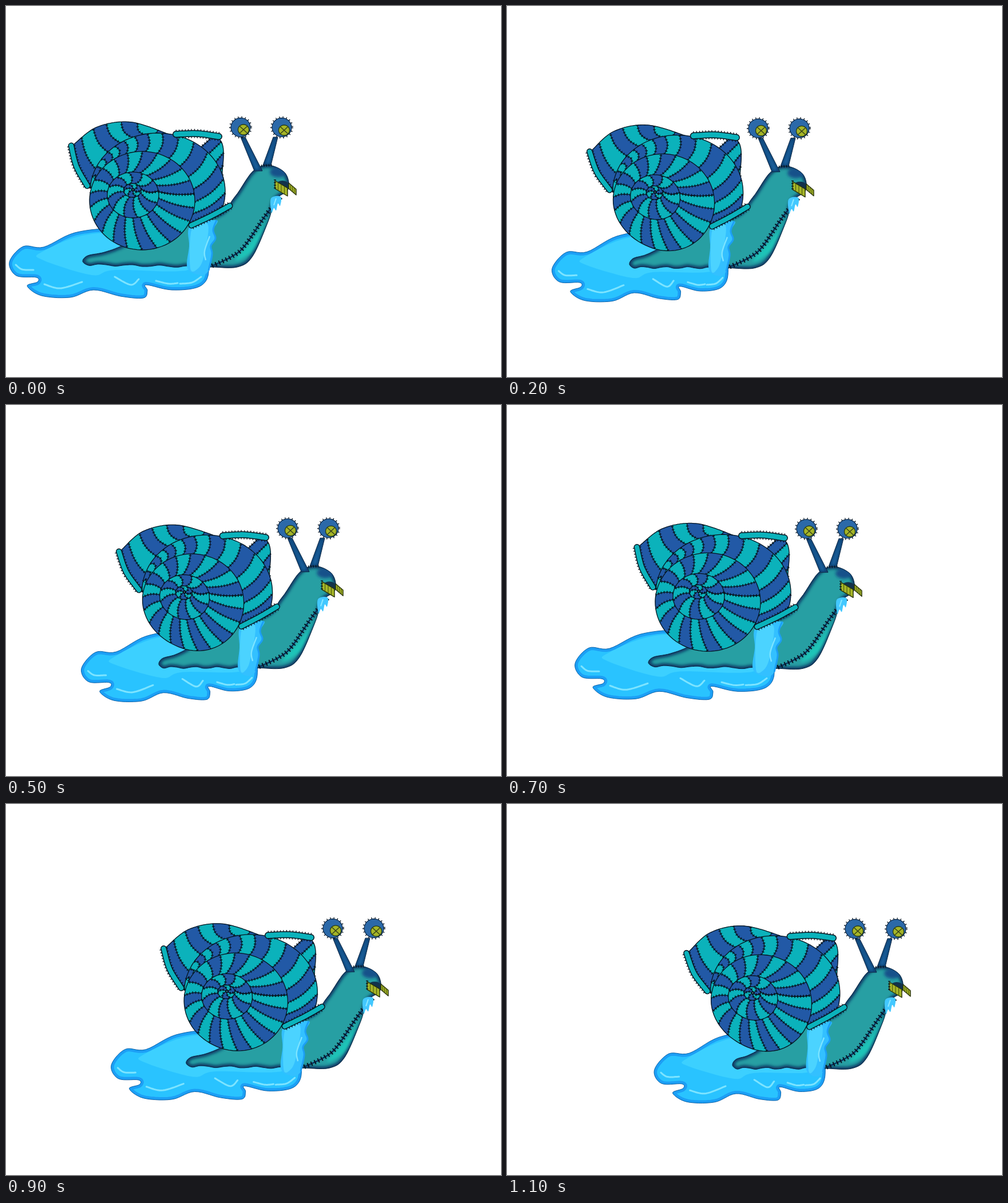
Recreate the animation shown at these times as an HTML page. Size 865x648 px, loop 1.2 s.

```html
<!DOCTYPE html>
<html lang="en">
<head>
<meta charset="utf-8">
<title>Patchwork snail</title>
<style>
html, body { margin: 0; width: 100%; height: 100%; overflow: hidden; background: #fff; }
svg { display: block; width: 865px; height: 648px; }
path { stroke-linejoin: round; }
</style>
</head>
<body>
<svg viewBox="0 0 865 648">
  <defs>
    <filter id="soft" x="-20%" y="-20%" width="140%" height="140%"><feGaussianBlur stdDeviation="2.4"/></filter>
  </defs>
  <g id="snail"></g>
</svg>
<script>
const STEP = 100, STEPS = 12, SQUEEZE = 62;
const CYAN = '#0bb2bb', BLUE = '#2259a6', INK = '#06141f', NAVY = '#0b3462', LIME = '#a5b527';
const snail = document.getElementById('snail');
const parts = [];
let clipCount = 0;

const clamp = v => Math.max(0, Math.min(1, v));
const mix = (a, b, t) => [a[0] + (b[0] - a[0]) * t, a[1] + (b[1] - a[1]) * t];

function pairs(text) {
  const n = text.trim().split(/[ ,]+/).map(Number);
  return n.filter((_, i) => i % 2 === 0).map((x, i) => [x, n[2 * i + 1]]);
}

// The head glides forward, a little slower in the middle of the crawl.
const travelKeys = pairs('0,0 2,29 5,82 7,113 9,161 11,198');
function travel(step) {
  const i = Math.max(1, travelKeys.findIndex(([at]) => at >= step));
  const [a, b] = [travelKeys[i - 1], travelKeys[i]];
  return mix(a, b, (step - a[0]) / (b[0] - a[0]))[1];
}
const sink = step => 6 * (step / 11) ** .75;
// The tail catches up and stretches out once, then starts to catch up again.
const squeeze = step => step < 7
  ? Math.sin(Math.PI * step / 7) ** .8
  : ((step - 7) / 4) ** 1.65;

// Each warp moves a resting point; q runs from 0 (stretched) to 1 (drawn in).
const rigid = p => p;
const puddleWarp = ([x, y], q) => {
  const u = clamp((355 - x) / 350);
  return [x + q * SQUEEZE * (.06 + 1.9 * u - 1.1 * u * u), y + q * 12 * u * u];
};
const tailWarp = ([x, y], q) => {
  const u = clamp((345 - x) / 211);
  return [x + q * SQUEEZE * u, y + q * 4 * u];
};
const shellWarp = ([x, y], q) => {
  const reach = Math.max(0, 396 - x);
  return [
    x + q * 12 * (y - 230) / 100 * Math.min(1, reach / 200),
    y + q * 11 * (reach / 288) ** 2 * clamp((425 - y) / 140)
  ];
};

// Catmull-Rom curve through points, as a function of 0..1.
function curve(pts, closed = false) {
  const n = closed ? pts.length : pts.length - 1;
  const at = i => closed ? pts[(i + n) % n] : pts[Math.max(0, Math.min(n, i))];
  return s => {
    const x = s * n, i = Math.min(n - 1, Math.floor(x)), t = x - i;
    const [a, b, c, d] = [at(i - 1), at(i), at(i + 1), at(i + 2)];
    return [0, 1].map(j => .5 * (2 * b[j] + (c[j] - a[j]) * t
      + (2 * a[j] - 5 * b[j] + 4 * c[j] - d[j]) * t * t
      + (3 * b[j] - a[j] - 3 * c[j] + d[j]) * t ** 3));
  };
}
const arc = (cx, cy, rx, ry, from = 0, to = 360) => s => {
  const a = (from + (to - from) * s) * Math.PI / 180;
  return [cx + rx * Math.cos(a), cy + ry * Math.sin(a)];
};
const sample = (f, n, from = 0, to = 1) =>
  Array.from({ length: n + 1 }, (_, i) => f(from + (to - from) * i / n));
const smooth = (pts, closed) => sample(curve(pts, closed), pts.length * 7);
const blob = text => smooth(pairs(text), true);
const thread = text => smooth(pairs(text), false);

function node(tag, attrs, parent = snail) {
  const el = document.createElementNS('http://www.w3.org/2000/svg', tag);
  for (const key in attrs) el.setAttribute(key, attrs[key]);
  return parent.appendChild(el);
}
function path(pts, warp, attrs, parent) {
  const closed = attrs.fill && attrs.fill !== 'none';
  const el = node('path', { fill: 'none', ...attrs }, parent);
  parts.push({ el, pts, warp, end: closed ? 'Z' : '' });
}
const line = (pts, warp, stroke, width, extra) =>
  path(pts, warp, { stroke, 'stroke-width': width, ...extra });
// A wide dashed line: short ticks across the path.
const ticks = (pts, warp, size, gap = 3.8, thick = 1.3) =>
  line(pts, warp, INK, size, { 'stroke-dasharray': `${thick} ${gap}` });

// A filled shape shaded along the inside of its rim; returns the clipped group.
function shaded(pts, warp, fill, rim, width, outline, soft) {
  const id = 'clip' + clipCount++, ring = [...pts, pts[0]];
  path(pts, warp, { fill: '#000' }, node('clipPath', { id }));
  const group = node('g', { 'clip-path': `url(#${id})` });
  path(pts, warp, { fill }, group);
  path(ring, warp, { stroke: rim, 'stroke-width': width, ...(soft && { filter: 'url(#soft)' }) }, group);
  line(ring, warp, outline, 1);
  return group;
}

// Alternating stripes between two curves, joined by stitched seams.
function stripes(inner, outer, count, colors, bend, pace = s => s) {
  const rib = s => {
    const a = inner(s), b = outer(s), len = Math.hypot(b[0] - a[0], b[1] - a[1]) || 1;
    return sample(v => {
      const p = mix(a, b, v), w = bend * Math.sin(Math.PI * v) / len;
      return [p[0] - (b[1] - a[1]) * w, p[1] + (b[0] - a[0]) * w];
    }, 6);
  };
  const cuts = sample(pace, count);
  for (let i = 0; i < count; i++) {
    const [s, e] = [cuts[i], cuts[i + 1]], fill = colors[i % 2];
    path([...rib(s), ...sample(outer, 5, s, e), ...rib(e).reverse(), ...sample(inner, 5, e, s)],
      shellWarp, { fill, stroke: fill, 'stroke-width': .6 });
  }
  for (const s of cuts) {
    line(rib(s), shellWarp, INK, 1.3);
    ticks(rib(s), shellWarp, 4.6);
  }
  line(sample(outer, 80), shellWarp, INK, 1.3);
}

function lip(text, width) {
  const pts = thread(text), round = { 'stroke-linecap': 'round' };
  ticks(pts, shellWarp, width + 7, 4);
  line(pts, shellWarp, INK, width + 3, round);
  line(pts, shellWarp, CYAN, width, round);
}

function drawPuddle() {
  const pool = blob(`190,389 120,396 66,421 30,420 6,447 18,471 53,474 55,482 37,489 62,506 112,509
    153,496 200,507 240,510 247,497 245,487 290,496 338,490 354,464 340,420 260,400`);
  const group = shaded(pool, puddleWarp, '#29c3ff', '#1c9ff5', 10, '#0f62a8');
  path(blob('62,430 150,398 300,400 325,459 190,461 150,470 65,444'), puddleWarp, { fill: '#3cd0ff' }, group);
  for (const shine of ['17,452 28,460 48,461', '67,486 95,493 133,482', '190,473 218,487 232,477',
    '262,480 284,485 300,484', '304,485 325,483 341,473'])
    line(thread(shine), puddleWarp, '#7de4ff', 3, { 'stroke-linecap': 'round' });
}

function drawBody() {
  const upper = pairs(`134,446 143,436 172,430 206,417 250,390 365,367 400,333 431,289 459,278 488,292
    493,320 470,339 459,374 431,437 404,456`);
  const sole = sample(s => [360 - 215 * s, 456 - 4 * s + 1.6 * Math.sin(s * 26)], 14);
  const group = shaded(smooth([...upper, ...sole], true), tailWarp, '#279fa3', NAVY, 8, '#08233d', true);
  path(blob('474,345 454,374 436,402 400,444 430,428 454,382'), rigid,
    { fill: '#1fc4b8', filter: 'url(#soft)' }, group);
  path(sample(arc(476, 290, 15, 9), 20), rigid, { fill: '#17518a', filter: 'url(#soft)' }, group);
  const belly = thread('480,334 454,365 417,419 394,438 360,454');
  line(belly, rigid, NAVY, 2.6);
  ticks(belly, rigid, 8, 4.6, 2);
}

function drawPour() {
  path(blob('322,384 368,374 362,391 366,406 358,419 360,434 354,462 340,470 317,458 320,420'),
    tailWarp, { fill: '#33c0ff' });
  line(thread('368,374 362,391 366,406 358,419 360,434 354,462'), tailWarp, '#1c9ff5', 3);
  path(blob('325,388 353,382 346,436 336,458 322,458'), tailWarp, { fill: '#4bd3ff' });
  line(thread('356,402 347,428 349,444'), tailWarp, '#7de4ff', 2.4);
}

function drawShell() {
  const whorl = arc(265, 324, 118, 102, -177, 14);
  const disk = [238, 340, 92, 86], heart = [222, 330, 45, 40], core = [221, 322, 15, 12];
  const blueFirst = [BLUE, CYAN], cyanFirst = [CYAN, BLUE];

  stripes(curve(pairs('300,226 349,255 378,306')), curve(pairs('300,226 373,233 378,293')), 4, blueFirst, 0,
    s => .4 + .6 * s);
  stripes(curve(pairs('147,316 188,250 235,226 292,227')),
    curve(pairs('118,242 160,211 220,203 292,227')), 7, blueFirst, -6);
  stripes(arc(...disk, -165, 28), whorl, 16, cyanFirst, 5, s => s - .09 * Math.sin(Math.PI * s) ** 2);
  stripes(arc(...heart, -8, 352), arc(...disk, -8, 352), 22, cyanFirst, 3);
  stripes(arc(...core, -10, 350), arc(...heart, -10, 350), 12, cyanFirst, 4);
  stripes(arc(222, 321, 1, 1, 20, 380), arc(...core), 6, cyanFirst, 3);

  lip('297,224 335,223 372,228', 9);
  lip('114,244 123,280 142,314', 8);
  lip('324,383 360,366 391,349', 8);
}

function drawStalk(top, base) {
  const side = d => [[top[0] + 4 * d, top[1]], [base[0] + 7 * d, base[1]]];
  shaded([...side(-1), ...side(1).reverse()], rigid, '#1d629f', NAVY, 4, '#0a2644', true);
}

function drawEye(x, y, px, py) {
  ticks(sample(arc(x, y, 17.5, 17), 40), rigid, 5, 4.6);
  path(sample(arc(x, y, 17, 16.5), 40), rigid, { fill: '#2b69a9', stroke: '#0c2747', 'stroke-width': 1.2 });
  path(sample(arc(px, py, 9.5, 9), 30), rigid, { fill: LIME, stroke: '#283b17', 'stroke-width': 1.3 });
  for (const d of [-1, 1])
    line([[px - 6.5, py - 6 * d], [px + 6.5, py + 6 * d]], rigid, '#34401a', 1.4);
}

function drawTusk(from, to, half) {
  const cut = t => [-half, half].map(h => [mix(from, to, t)[0], mix(from, to, t)[1] + h]);
  path([...cut(0), ...cut(1).reverse()], rigid, { fill: LIME, stroke: '#26300c', 'stroke-width': 1.4 });
  for (const t of [.25, .5, .75]) line(cut(t), rigid, '#4a5611', 1.1);
}

function drawHead() {
  drawStalk([414, 229], [441, 288]);
  drawStalk([471, 229], [456, 278]);
  ticks([[446, 279], [465, 278]], rigid, 4, 3);
  drawEye(410, 212, 415, 216);
  drawEye(482, 212, 486, 217);
  path(sample(arc(483, 314, 12, 9), 20), rigid, { fill: '#12324b' });
  path(blob('463,336 480,333 479,349 475,345 472,357 468,353 464,361'), rigid, { fill: '#43c8ff' });
  line([[472, 336], [468, 348]], rigid, '#8ce9ff', 2);
  drawTusk([470, 312], [492, 325], 7);
  drawTusk([494, 314], [507, 325], 5);
  ticks([[470, 303], [470, 321]], rigid, 4, 3.4);
}

function render(step) {
  snail.setAttribute('transform', `translate(${travel(step)} ${sink(step)})`);
  const q = squeeze(step);
  for (const { el, pts, warp, end } of parts)
    el.setAttribute('d', 'M' + pts.map(p => warp(p, q).map(v => v.toFixed(1)).join(' ')).join('L') + end);
}

drawPuddle();
drawBody();
drawPour();
drawShell();
drawHead();

let shown = -1;
const start = performance.now();
function tick() {
  const step = Math.floor((performance.now() - start) / STEP) % STEPS;
  if (step !== shown) render(shown = step);
  requestAnimationFrame(tick);
}
tick();
</script>
</body>
</html>
```
